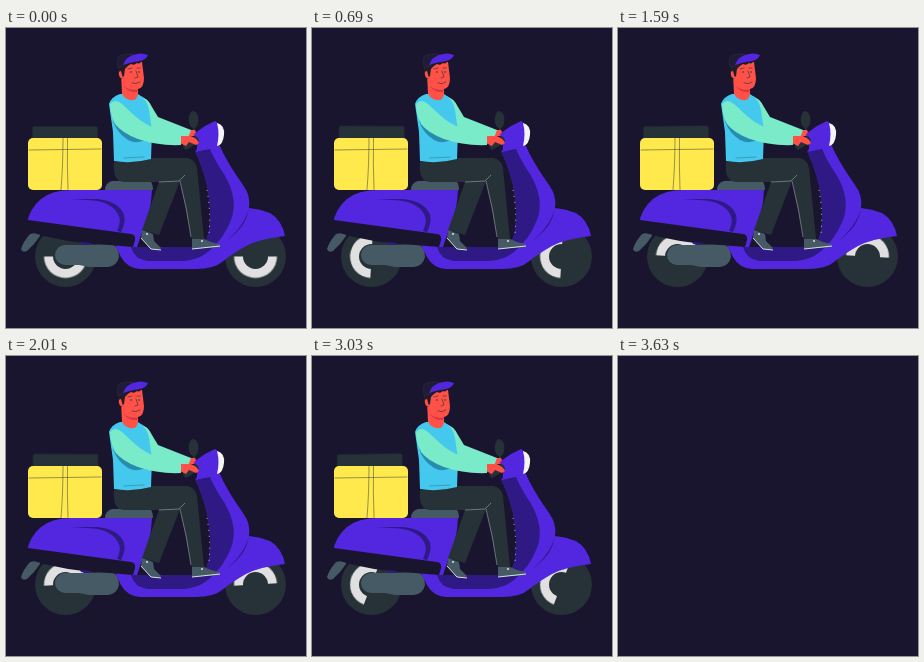
Write an HTML page that moves like this. It is 300 px wide and 300 px high and loops after 3660 ms.

```html
<!DOCTYPE html>
<html lang="en">
<head>
<meta charset="utf-8">
<title>Scooter courier</title>
<style>
  html, body { margin: 0; width: 100%; height: 100%; overflow: hidden; background: #19152f; }
  svg { display: block; width: 100vw; height: 100vh; }
  .scene { animation: blink 3660ms step-end infinite; }
  .rim { animation: spin 3660ms steps(122) infinite; }
  .lid { transform-origin: 59px 110px; animation: sway 3660ms cubic-bezier(.37, 0, .63, 1) infinite; }
  @keyframes blink { 0% { visibility: visible; } 99.18% { visibility: hidden; } }
  /* 51 degrees every 30 ms: 17 turns in 3600 ms */
  @keyframes spin { from { transform: rotate(0deg); } to { transform: rotate(6222deg); } }
  @keyframes sway {
    0%, 99.18%, 100% { transform: translate(0, 0) rotate(0deg); }
    12.4%, 62% { transform: translate(1px, -.4px) rotate(.5deg); }
    37.2%, 86.8% { transform: translate(-1.3px, -.4px) rotate(-1deg); }
  }
  .dark { fill: #263238; }
  .grey { fill: #455a64; }
  .purple { fill: #5327e0; }
  .shade { fill: #2f1985; }
  .night { fill: #19152f; }
  .skin { fill: #ff5148; }
  .mint { fill: #7aebc8; }
  .blue { fill: #45c8ee; }
  .yellow { fill: #ffe94d; }
  .pale { fill: #e0e0e0; }
  .line { fill: none; stroke: #263238; stroke-width: .6; stroke-linecap: round; stroke-linejoin: round; }
</style>
</head>
<body>
<svg viewBox="0 0 300 300">
  <g class="scene">
    <!-- wheels and exhaust -->
    <path class="grey" d="M34 204L24 206Q17 214 15 221Q16 225 21 223Q29 216 34 208Z"/>
    <g transform="translate(59.5 228.5)">
      <circle class="dark" r="30.5"/>
      <path class="rim pale" d="M-21.500 0A21.500 21.500 0 0 0 21.500 0Z"/>
      <circle class="dark" r="12.5"/>
    </g>
    <g transform="translate(249.5 228.5)">
      <circle class="dark" r="30.5"/>
      <path class="rim pale" d="M-21.500 0A21.500 21.500 0 0 0 21.500 0Z"/>
      <circle class="dark" r="12.5"/>
    </g>
    <path class="grey" d="M59 217H84L104 215Q113 218 113 229Q111 238 102 239H83Q78 238 73 237H59A10 10 0 0 1 59 217Z"/>

    <!-- scooter body -->
    <path class="purple" d="M189 123L213 116Q220 133 237 157Q245 168 243 180Q254 181 264 185Q276 192 279 208Q253 211 240 218Q226 226 216 234Q208 241 190 241H134Q121 240 115 229L109 217L126 210L131 219H195Q204 212 204 188Q205 157 189 123Z"/>
    <path class="shade" d="M189 123L204 121Q209 133 218 146Q233 171 225 192Q217 212 202 224Q192 232 178 233H141Q128 231 125 219H195Q204 212 204 188Q205 157 189 123Z"/>
    <path class="shade" d="M243 180Q238 199 219 214Q230 206 236 198Q241 191 243 180Z"/>
    <path d="M201 162Q205 184 203 207" fill="none" stroke="#eee" stroke-width=".8" stroke-dasharray="1 5"/>
    <path class="purple" d="M21 196Q23 181 35 171Q46 162 66 162H146Q145 186 136 204L131 219L118 217Z"/>
    <path class="shade" d="M64 171H91Q113 173 118 187Q120 194 115 204L111 203Q116 193 112 186Q106 175 88 172.500Z"/>
    <path class="night" d="M22 192L125 206Q130 207 129 212L127 219L103 217Q63 216 20 203Q16 201 18 195Q19 192 22 192Z"/>
    <path class="shade" d="M74 214L86 215L81 217L75 216Z"/>

    <!-- seat -->
    <path class="grey" d="M99 162Q99 155 106 153L142 152Q147 153 147 162Z"/>

    <!-- box -->
    <rect class="lid dark" x="26.5" y="98.5" width="65" height="14" rx="1.5"/>
    <rect class="yellow" x="22" y="110" width="74" height="52" rx="5"/>
    <path class="line" stroke-opacity=".8" d="M23 122L95 121M55 161.500Q57 138 57 110M62 161.500Q61 138 61.500 110"/>

    <!-- far arm, mirror, head lamp -->
    <path class="dark" d="M187 83C192 83 194 92 191 98L189 100L190 107H187L187 100C181 98 182 84 187 83Z"/>
    <path class="skin" d="M182 102L189 102L191 107L183 109Z"/>
    <path class="mint" d="M132 67Q142 70 146 79L152 89L185 102L182 110L150 105L137 95Z"/>
    <path class="purple" d="M188 106Q193 102 199 98L209 93Q216 97 217 106Q216 116 211 119L190 124Q193 115 188 106Z"/>
    <path d="M211 95Q219 97 218 107Q217 117 211 118Q214 106 211 95Z" fill="#f4f4f4"/>
    <path class="dark" d="M178 112L190 108Q193 110 193 114L180 122Q175 119 178 112Z"/>

    <!-- legs -->
    <path class="dark" d="M108 134L146 130H181Q189 131 191 140L198 211L186 212L174 153L153 207L136 202L153 154H118Q106 153 108 134Z"/>
    <path d="M153 154L173 153L179 147M174 153Q181 180 185 209" fill="none" stroke="#9aa5a8" stroke-width=".6"/>
    <path class="grey" d="M136 202L147 206L148 213L155 220L153 222L145 221L135 210Z"/>
    <path class="grey" d="M186 211L198 211L205 214L213 216L214 219L186 221Z"/>
    <path d="M135 210L145 221L155 222M186 221L214 218" fill="none" stroke="#ddd" stroke-width="1"/>
    <g class="pale"><circle cx="141" cy="206" r="1"/><circle cx="196" cy="213" r="1"/></g>

    <!-- torso and near arm -->
    <path class="blue" d="M103 76Q105 69 114 66L132 66Q141 71 143 82L146 103L145 131Q126 136 108 133L107 104Z"/>
    <path d="M107 93L113 97Q121 106 141 111Q132 117 122 112Q111 105 107 93Z" fill="#278cae"/>
    <path class="skin" d="M173 108L184 108Q191 110 193 115L190 117L183 114L180 118L174 115Z"/>
    <path class="mint" d="M104 76Q109 70 116 76L129 88Q138 96 149 100L175 108V117Q152 118 132 111Q116 105 109 96Q104 86 104 76Z"/>
    <path class="line" d="M118 130L138 129" stroke-opacity=".5"/>

    <!-- head -->
    <path class="skin" d="M115 46L116 66Q120 73 128 72Q133 70 132 61Q138 60 138 50L136 34H116Z"/>
    <path d="M117 57Q122 63 132 61.500L131 64Q122 65 117 57Z" fill="#d83740"/>
    <path d="M112 37L120 31L136 32Q134 37 131 35Q128 38 125 36Q121 38 119 41L118 48L115 51Q111 46 112 37Z" fill="#211d28"/>
    <path class="skin" d="M115 43Q112 43 113 47Q114 51 117 50Z"/>
    <path d="M112 39Q110 31 113 28Q118 25 127 26L118 38Z" fill="#1f1b36" stroke="#3b3450" stroke-width=".4"/>
    <path class="purple" d="M117 37Q120 29 127 27Q135 24 142 27Q140 32 134 33Q125 34 117 37Z"/>
    <path class="line" d="M122 41L126 40M131 40L134 40M130 43L132 49L129 50M126 55Q130 57 134 54"/>
    <g class="dark"><circle cx="125" cy="44" r=".8"/><circle cx="133" cy="44" r=".8"/></g>
  </g>
</svg>
</body>
</html>
```
